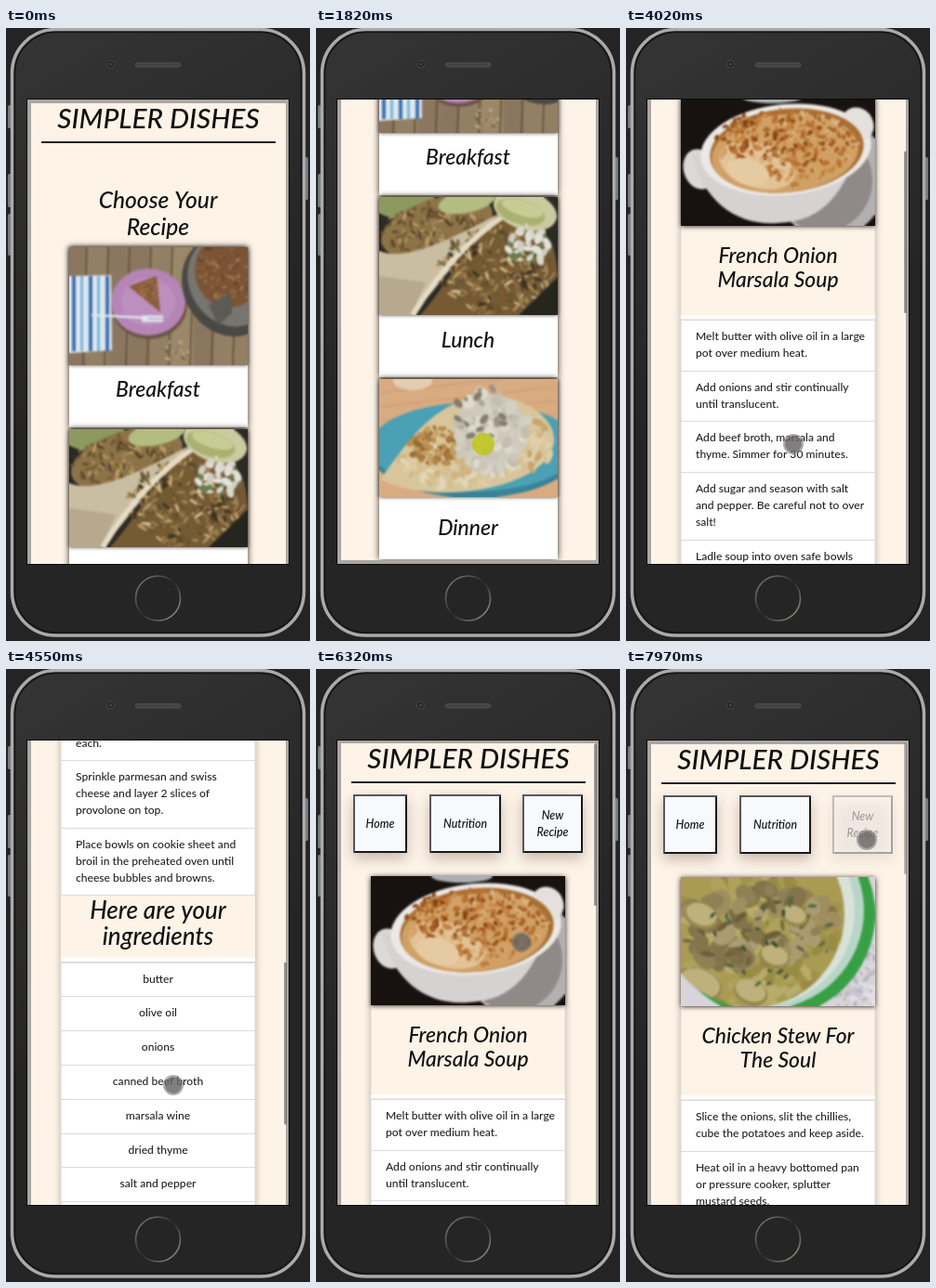
An HTML page with a canvas for the animation above (8 s loop, 327 by 660 pixels).

```html
<!DOCTYPE html>
<html lang="en">
<head>
<meta charset="utf-8">
<title>Recipe app on a phone</title>
<style>
html, body { margin: 0; width: 100%; height: 100%; overflow: hidden; background: #242424; }
canvas { display: block; }
</style>
</head>
<body>
<canvas id="stage" width="327" height="660"></canvas>
<script>
const LOOP = 8000, CREAM = '#fdf3e7', INK = '#111';
const g = document.getElementById('stage').getContext('2d');

let seed = 7;
const rnd = () => (seed = (seed * 16807) % 2147483647) / 2147483647;
const pick = list => list[Math.floor(rnd() * list.length)];
const clamp = v => Math.max(0, Math.min(1, v));

// ---- shape helpers ----
function box(c, x, y, w, h, fill) { c.fillStyle = fill; c.fillRect(x, y, w, h); }

function oval(c, x, y, rx, ry, fill, turn = 0) {
  c.beginPath(); c.ellipse(x, y, rx, ry, turn, 0, 7); c.fillStyle = fill; c.fill();
}

function poly(c, fill, ...p) {
  c.beginPath();
  for (let i = 0; i < p.length; i += 2) c.lineTo(p[i], p[i + 1]);
  c.fillStyle = fill; c.fill();
}

function round(c, x, y, w, h, r, fill, stroke, width) {
  c.beginPath(); c.roundRect(x, y, w, h, r);
  if (fill) { c.fillStyle = fill; c.fill(); }
  if (stroke) { c.strokeStyle = stroke; c.lineWidth = width; c.stroke(); }
}

function line(c, color, width, x1, y1, x2, y2) {
  c.strokeStyle = color; c.lineWidth = width;
  c.beginPath(); c.moveTo(x1, y1); c.lineTo(x2, y2); c.stroke();
}

// Scatter small tilted ovals inside an ellipse.
function scatter(c, n, x, y, rx, ry, size, colors, flat = .5) {
  for (let i = 0; i < n; i++) {
    const a = rnd() * 6.283, d = Math.sqrt(rnd()), s = size * (.4 + rnd() * .8);
    oval(c, x + Math.cos(a) * d * rx, y + Math.sin(a) * d * ry, s, s * flat, pick(colors), rnd() * 3);
  }
}

// Paint a picture once, then soften it.
function photo(w, h, back, paint) {
  const [raw, soft] = [0, 1].map(() => Object.assign(document.createElement('canvas'), { width: w, height: h }));
  const c = raw.getContext('2d'), s = soft.getContext('2d');
  box(c, 0, 0, w, h, back);
  paint(c);
  s.drawImage(raw, 0, 0);
  s.filter = 'blur(1.1px)';
  s.drawImage(raw, 0, 0);
  return soft;
}

// ---- food pictures ----
const breakfastPic = photo(192, 127, '#94805f', c => {
  for (let i = 0; i < 9; i++) {
    box(c, i * 23 - 4, 0, 22, 127, pick(['#8b7760', '#9b8869', '#938064']));
    line(c, '#5d4c38', 1.5, i * 23 - 4, 0, i * 23 - 8, 127);
  }
  poly(c, '#dfe7ee', 0, 31, 45, 30, 46, 111, 0, 114);
  for (let i = 0; i < 5; i++) box(c, 3 + i * 9, 31, i % 2 ? 3 : 4, 81, i % 2 ? '#79b6d8' : '#3d72b2');
  oval(c, 86, 62, 41, 37, '#6d5347');
  oval(c, 85, 59, 40, 36, '#b485b5');
  oval(c, 85, 59, 29, 26, '#bd8fbe');
  poly(c, '#8a5f3c', 64, 42, 94, 31, 98, 70);
  scatter(c, 40, 87, 46, 10, 10, 2, ['#ad8056', '#6e4a2e', '#9c7146']);
  line(c, '#dfe6f0', 2.5, 24, 73, 80, 76);
  line(c, '#dfe6f0', 7, 78, 77, 101, 77);
  line(c, '#9a86a8', 1, 85, 77, 102, 77);
  oval(c, 171, 42, 48, 56, '#4a4844', -.5);
  oval(c, 173, 36, 44, 51, '#77756f', -.5);
  oval(c, 172, 25, 37, 40, '#7b5436');
  scatter(c, 150, 172, 25, 35, 37, 3, ['#8f6845', '#65452c', '#9d7750', '#74502f']);
  poly(c, '#5c5a55', 174, 49, 150, 62, 160, 84, 175, 71);
  scatter(c, 28, 114, 112, 14, 11, 2.2, ['#b89b72', '#75573b', '#c5b08f']);
});

const lunchPic = photo(192, 127, '#2b2b25', c => {
  const meat = ['#a28558', '#77592f', '#bb9d69', '#8f7143', '#57442a', '#6b5433'];
  oval(c, 28, 8, 38, 17, '#8c9a60', .1);
  oval(c, 62, 32, 62, 30, '#8d7448', -.3);
  scatter(c, 170, 60, 36, 60, 27, 5, meat, .3);
  oval(c, 94, 5, 31, 12, '#b3bd82', -.2);
  // left tortilla, folded along a curve
  c.beginPath(); c.moveTo(0, 58);
  c.bezierCurveTo(25, 68, 60, 55, 132, 16);
  c.bezierCurveTo(92, 52, 66, 96, 34, 127); c.lineTo(0, 127);
  c.fillStyle = '#c9bda2'; c.fill();
  poly(c, '#b6a98d', 0, 85, 50, 92, 34, 127, 0, 127);
  // right filling
  c.beginPath(); c.moveTo(130, 22);
  c.bezierCurveTo(195, 25, 192, 65, 192, 110); c.lineTo(192, 127); c.lineTo(44, 127);
  c.bezierCurveTo(70, 100, 90, 55, 130, 22);
  c.fillStyle = '#755a34'; c.fill();
  scatter(c, 290, 126, 80, 62, 46, 5.5, meat, .3);
  scatter(c, 40, 122, 84, 58, 40, 5, ['#d0b98c', '#3b3021'], .3);
  c.beginPath(); c.moveTo(36, 127); c.quadraticCurveTo(78, 58, 134, 20);
  c.strokeStyle = '#e6dcc5'; c.lineWidth = 6; c.stroke();
  oval(c, 157, 14, 35, 21, '#cbcaa0', .3);
  oval(c, 152, 16, 27, 13, '#a9b070', .3);
  oval(c, 154, 12, 23, 8, '#c6cc93', .3);
  scatter(c, 40, 161, 50, 24, 20, 6, ['#e3e2da', '#cfcec2', '#d9d8cd', '#6a7d4d'], .6);
  scatter(c, 20, 112, 74, 55, 40, 2.5, ['#4c5f31', '#657746']);
  poly(c, '#25261f', 192, 86, 192, 127, 150, 127);
});

const dinnerPic = photo(192, 127, '#d9ab80', c => {
  for (let i = 0; i < 5; i++) line(c, '#c99a6e', 1, 0, i * 15, 191, i * 15 - 22);
  oval(c, 36, 2, 21, 10, '#e2cdb2');
  oval(c, 102, 77, 112, 51, '#3a8298');
  oval(c, 102, 73, 112, 48, '#4aa0b4');
  c.beginPath(); c.moveTo(1, 108);
  c.bezierCurveTo(25, 76, 44, 45, 78, 28);
  c.bezierCurveTo(125, 0, 193, 33, 188, 69);
  c.bezierCurveTo(180, 118, 60, 138, 1, 108);
  c.fillStyle = '#d8c59b'; c.fill();
  scatter(c, 160, 84, 92, 62, 24, 6, ['#dccba3', '#cfb582', '#d6c091', '#e2d6b8'], .6);
  scatter(c, 90, 62, 72, 28, 21, 5, ['#a87a3e', '#b98d4f', '#976a31', '#c5a065'], .6);
  scatter(c, 70, 162, 72, 24, 28, 6, ['#d9c094', '#c6a570', '#dfcfa9'], .6);
  oval(c, 120, 58, 39, 42, '#cfcabb', -.2);
  scatter(c, 110, 122, 58, 40, 46, 7, ['#d3cfc1', '#c3beaf', '#dedacd', '#cbc6b7'], .7);
  scatter(c, 24, 112, 38, 32, 30, 5, ['#9a9283', '#857c6c', '#aea595'], .6);
});

const soupPic = photo(209, 139, '#17120f', c => {
  oval(c, 160, 86, 62, 66, '#b3b0b0');
  oval(c, 153, 90, 53, 55, '#8f8a88');
  oval(c, 98, 0, 33, 7, '#a9b0b4');
  oval(c, 20, 78, 17, 22, '#dcd9d8', -.3);
  c.beginPath(); c.moveTo(12, 62);
  c.bezierCurveTo(25, 115, 62, 139, 104, 136);
  c.bezierCurveTo(155, 134, 176, 104, 197, 40);
  c.fillStyle = '#d5d2d1'; c.fill();
  oval(c, 113, 57, 92, 49, '#ebe8e5', -.1);
  oval(c, 190, 30, 17, 19, '#e4e0dd', -.5);
  oval(c, 114, 58, 83, 45, '#a86f35', -.1);
  oval(c, 112, 61, 79, 42, '#d0a064', -.1);
  oval(c, 82, 74, 42, 24, '#e2c297', .3);
  scatter(c, 230, 118, 50, 74, 36, 4, ['#b9722f', '#c58340', '#d3a062', '#a45c20', '#dab37c'], .6);
  scatter(c, 110, 112, 44, 74, 30, 3, ['#94501b', '#a8602a', '#83420f'], .6);
  scatter(c, 40, 104, 72, 66, 25, 3, ['#b9793c', '#d0a066'], .6);
  oval(c, 72, 81, 24, 14, '#e6caa2', .3);
});

const stewPic = photo(209, 139, '#d7d5d9', c => {
  scatter(c, 140, 185, 105, 35, 42, 4, ['#e5e3e9', '#b8b4be', '#c9c5ce']);
  oval(c, 96, 40, 113, 112, '#37a045');
  oval(c, 88, 36, 109, 107, '#b9d5c8');
  oval(c, 84, 36, 103, 103, '#d8e2d9');
  oval(c, 77, 40, 99, 100, '#a99b52');
  c.save(); c.beginPath(); c.ellipse(77, 40, 99, 100, 0, 0, 7); c.clip();
  scatter(c, 130, 78, 68, 96, 80, 13, ['#b0a25a', '#a19249', '#b9ab69', '#998a44']);
  scatter(c, 70, 80, 56, 86, 44, 13, ['#8f8055', '#9f8e5f', '#83744b', '#aa9c70'], .7);
  scatter(c, 24, 76, 60, 75, 38, 9, ['#6b5f3a', '#766941'], .35);
  for (const [x, y, r] of [[22, 42, 19], [101, 86, 17], [21, 116, 24], [75, 124, 19], [122, 42, 15]]) {
    oval(c, x, y, r, r * .72, '#95874d', .4);
    oval(c, x, y - 2, r - 2, r * .6, '#bfb17b', .4);
  }
  scatter(c, 30, 94, 63, 75, 55, 4.5, ['#42573a', '#526843', '#364a33'], .4);
  c.restore();
});

// ---- text ----
function label(str, x, y, size, align = 'center', color = INK) {
  g.font = `italic 500 ${size}px Lato, sans-serif`;
  g.textAlign = align; g.fillStyle = color; g.fillText(str, x, y);
}

function body(str, x, y, align) {
  g.font = '500 12.1px Lato, "Open Sans", sans-serif';
  g.textAlign = align; g.fillStyle = '#222'; g.fillText(str, x, y);
}

function shadowed(blur, dy, color, paint) {
  g.save();
  g.shadowColor = color; g.shadowBlur = blur; g.shadowOffsetY = dy;
  paint();
  g.restore();
}

// ---- pages ----
const french = {
  pic: soupPic, max: 897, title: ['French Onion', 'Marsala Soup'],
  steps: [
    'Melt butter with olive oil in a large|pot over medium heat.',
    'Add onions and stir continually|until translucent.',
    'Add beef broth, marsala and|thyme. Simmer for 30 minutes.',
    'Add sugar and season with salt|and pepper. Be careful not to over|salt!',
    'Ladle soup into oven safe bowls|and place a slice of bread on top of|each.',
    'Sprinkle parmesan and swiss|cheese and layer 2 slices of|provolone on top.',
    'Place bowls on cookie sheet and|broil in the preheated oven until|cheese bubbles and browns.'],
  items: ['butter', 'olive oil', 'onions', 'canned beef broth', 'marsala wine', 'dried thyme',
    'salt and pepper', 'sugar', 'french bread', 'provolone cheese', 'swiss cheese',
    'parmesan cheese', 'parsley']
};
const stew = {
  pic: stewPic, max: 1230, title: ['Chicken Stew For', 'The Soul'],
  steps: [
    'Slice the onions, slit the chillies,|cube the potatoes and keep aside.',
    'Heat oil in a heavy bottomed pan|or pressure cooker, splutter|mustard seeds.'],
  items: []
};
const home = { max: 250 };

function header() {
  label('SIMPLER DISHES', 164, 108, 29.8);
  box(g, 38, 122, 252, 2, '#222');
}

function frameBorder(bottom) {
  const tone = '#aaa6a3';
  box(g, 23, 77, 281, 4, tone);
  box(g, 23, 77, 4, bottom - 77, tone);
  box(g, 301, 77, 3, bottom - 77, tone);
  box(g, 23, bottom - 4, 281, 4, tone);
}

function drawHome() {
  header();
  label('Choose Your', 163.5, 194, 24.6);
  label('Recipe', 163.5, 223, 24.6);
  const cards = [['Breakfast', breakfastPic, 397], ['Lunch', lunchPic, 594], ['Dinner', dinnerPic, 796]];
  cards.forEach(([name, pic, base], i) => {
    const y = 236 + i * 196;
    shadowed(7, 0, '#3a2a22', () => box(g, 68, y, 192, 194, '#fff'));
    shadowed(4, 0, '#443c38', () => g.drawImage(pic, 68, y));
    label(name, 163.5, base, 22.9);
  });
}

function button(x, w, lines, alpha = 1) {
  g.globalAlpha = alpha;
  shadowed(14, 6, 'rgba(60,30,10,.28)', () => box(g, x, 136, w, 63, '#f8f9fb'));
  poly(g, '#55585c', x, 136, x + w, 136, x + w - 2, 138, x + 2, 138, x + 2, 197, x, 199);
  poly(g, '#17191c', x + w, 136, x + w, 199, x, 199, x + 2, 197, x + w - 2, 197, x + w - 2, 138);
  lines.forEach((s, i) => label(s, x + w / 2, 172 + (i - (lines.length - 1) / 2) * 18, 12.4));
  g.globalAlpha = 1;
}

function list(rows, y, align) {
  const top = y;
  for (const row of rows) {
    const lines = row.split('|'), h = 18.4 + 18.1 * lines.length + (align === 'center' ? .3 : 0);
    box(g, 59, y, 209, h, '#fff');
    box(g, 59, Math.round(y), 209, 1, '#dcdcdc');
    lines.forEach((s, i) => body(s, align === 'center' ? 163.5 : 75, y + 22 + 18 * i, align));
    y += h;
  }
  g.strokeStyle = '#dedad6'; g.lineWidth = 1;
  g.strokeRect(59, top, 209, y - top);
  return y;
}

function drawRecipe(r, dim) {
  header();
  button(40, 58, ['Home']);
  button(122, 77, ['Nutrition']);
  button(222, 65, ['New', 'Recipe'], dim);
  shadowed(8, 1, 'rgba(60,40,25,.35)', () => box(g, 59, 224, 209, r.max + 347, CREAM));
  g.strokeStyle = '#dfdad5'; g.lineWidth = 1;
  g.strokeRect(59, 363, 209, 102);
  shadowed(5, 1, '#4a403a', () => g.drawImage(r.pic, 59, 224));
  r.title.forEach((s, i) => label(s, 163.5, 403 + 25.5 * i, 22.9));
  box(g, 59, 459, 209, 5, '#fffdfb');
  const y = list(r.steps, 464, 'left');
  if (!r.items.length) return;
  label('Here are your', 163.5, y + 25, 26);
  label('ingredients', 163.5, y + 53, 26);
  box(g, 59, y + 67, 209, 5, '#fffdfb');
  list(r.items, y + 72, 'center');
}

// ---- timing ----
// Progress 0..1 moving in n even jumps, the first at a and the last at b.
const jumps = (t, a, b, n) => clamp((Math.floor((t - a + 6) * (n - 1) / (b - a)) + 1) / n);

function scrollAt(t) {
  if (t < 1910) return 250 * (1 - (1 - jumps(t, 980, 1360, 6)) ** 1.8);
  if (t < 5300) {
    const p = jumps(t, 3930, 4710, 11) * 11;
    return p <= 9 ? 675 * p / 9 : 675 + 111 * (p - 9);
  }
  const p = jumps(t, 5320, 6010, 10);
  return t < 6400 ? 1 + 896 * (1 - p) ** 2.184 : 0;
}

function pageAt(t) {
  if (t < 1910) return home;
  if (t < 2210) return null;
  if (t < 7180) return french;
  return t < 7420 ? null : stew;
}

function cursorAt(t) {
  const p = jumps(t, 200, 590, 6), q = clamp((p * 6 - 1) / 5);
  if (t < 6315) return [244 - 64 * q, 634 - 186 * q];
  const m = clamp(Math.floor((t - 6314) / 79) / 3);
  return [221 + 38 * m, 294 - 110 * m];
}

// Spans when the scroll thumb shows; each fades over its last 100 ms.
const thumbSpans = [[975, 1680], [2210, 2920], [3925, 5180], [5315, 6600], [7420, 8040]];

function thumb(t, page, s) {
  const span = thumbSpans.find(([a, b]) => t >= a && t < b);
  if (!span || !page) return;
  const h = 488 * 500 / (page.max + 500);
  g.globalAlpha = .55 * clamp((span[1] - t) / 100);
  round(g, 299, 80 + s / page.max * (488 - h), 3, h, 1.5, '#4a4a4a');
  g.globalAlpha = 1;
}

function drawScreen(t) {
  const page = pageAt(t), s = scrollAt(t);
  g.save();
  g.beginPath(); g.rect(23, 77, 281, 500); g.clip();
  box(g, 23, 77, 281, 500, CREAM);
  g.translate(0, -Math.round(s));
  if (page === home) drawHome();
  else if (page) drawRecipe(page, t < 6470 ? 1 : 1 - .65 * clamp((t - 6470) / 300));
  else header();
  frameBorder(page ? 577 + page.max : 140);
  g.translate(0, Math.round(s));
  thumb(t, page, s);
  g.restore();
}

function drawCursor(t) {
  if (t < 200) return;
  const [x, y] = cursorAt(t);
  if (t >= 1815 && t < 1980 || t >= 7095 && t < 7180) return oval(g, x, y, 12, 12, 'rgba(190,198,25,.85)');
  oval(g, x, y, 11, 11, 'rgba(120,120,120,.6)');
  oval(g, x, y, 9, 9, 'rgba(95,90,88,.55)');
}

function drawPhone() {
  box(g, 0, 0, 327, 660, '#242424');
  for (const [x, y, h] of [[2, 83, 25], [2, 157, 36], [2, 200, 45], [321, 139, 46]])
    round(g, x, y, 4, h, 1.5, '#77787a');
  const shell = g.createLinearGradient(0, 0, 200, 330);
  shell.addColorStop(0, '#353535');
  shell.addColorStop(.5, '#2d2d2d');
  shell.addColorStop(1, '#252525');
  round(g, 6.5, 1.5, 314, 652.5, 47, shell, '#aaaaab', 3.5);
  round(g, 9.5, 4.5, 308, 646.5, 44, null, '#161616', 1.5);
  round(g, 139, 37.5, 49, 4.5, 2.2, '#434343', '#565656', .7);
  oval(g, 112.5, 39, 4.5, 4.5, '#454545');
  oval(g, 112.5, 39, 3.4, 3.4, '#262628');
  oval(g, 112.5, 39, 1.4, 1.4, '#4a4a52');
  const ring = g.createLinearGradient(145, 596, 182, 632);
  ring.addColorStop(0, '#77736d');
  ring.addColorStop(.5, '#292929');
  ring.addColorStop(1, '#8b857d');
  g.beginPath(); g.arc(163.5, 614, 24, 0, 7);
  g.strokeStyle = ring; g.lineWidth = 1.6; g.stroke();
  box(g, 22, 76, 283, 502, '#0c0c0c');
}

function render(now) {
  const t = now % LOOP;
  drawPhone();
  drawScreen(t);
  drawCursor(t);
  requestAnimationFrame(render);
}
requestAnimationFrame(render);
</script>
</body>
</html>
```
